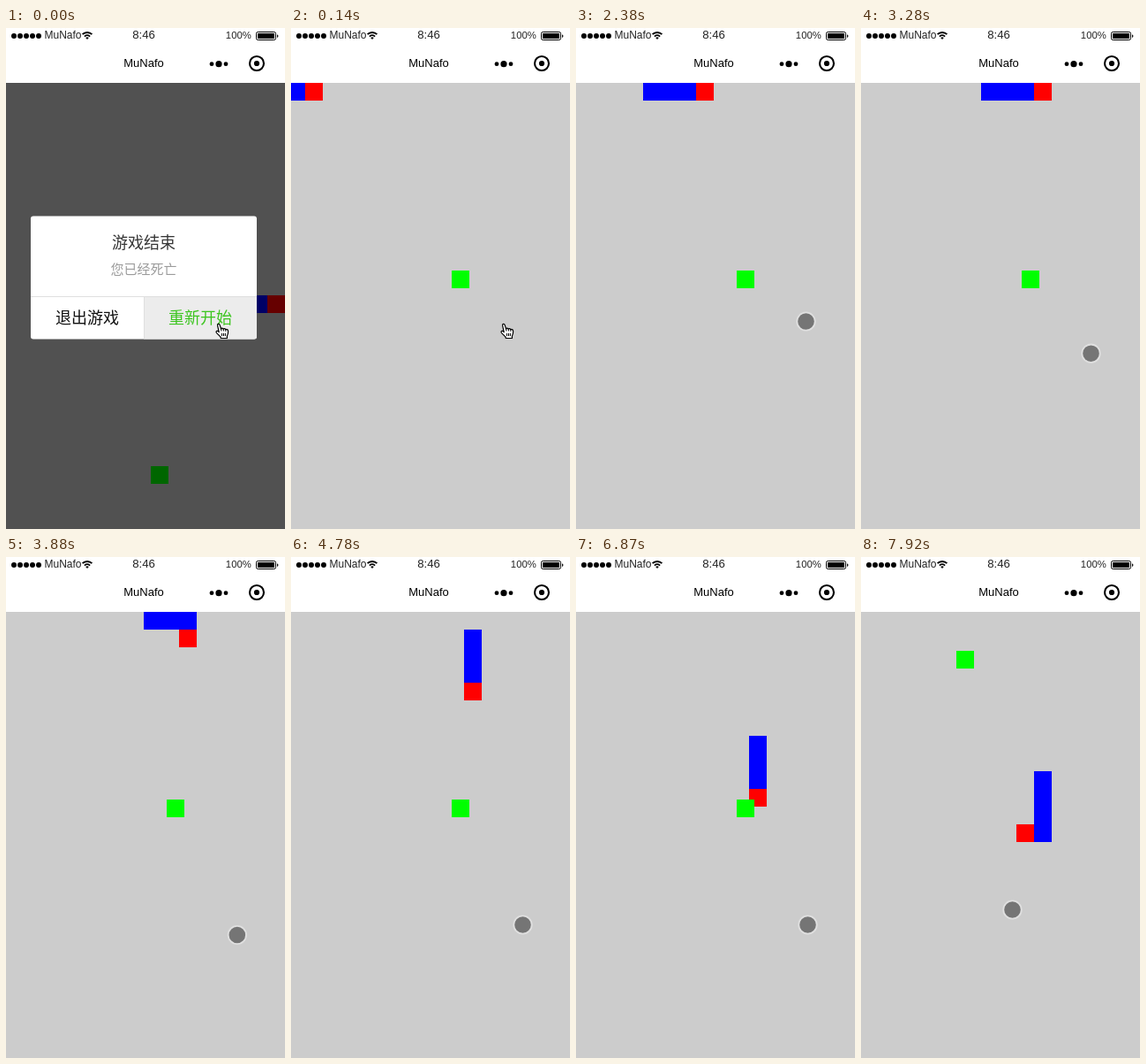
Recreate the animation shown at these times as an HTML page. Size 316 px wide and 566 px high, loop 8 s.

```html
<!DOCTYPE html>
<html lang="zh">
<head>
<meta charset="utf-8">
<title>Snake</title>
<style>
  html, body { margin: 0; width: 316px; height: 566px; overflow: hidden; background: #fff; }
  svg { display: block; }
  text { font-family: "Liberation Sans", Arial, sans-serif; text-anchor: middle; }
  .status text { fill: #222; }
  .dialog text { font-family: "Noto Sans CJK SC", "Noto Sans CJK", sans-serif; font-size: 18px; font-weight: 300; }
</style>
</head>
<body>
<svg width="316" height="566" viewBox="0 0 316 566">
  <rect y="62" width="316" height="504" fill="#ccc"/>
  <g id="snake"></g>
  <rect id="food" width="20" height="20" fill="#0f0"/>

  <g id="modal" class="dialog">
    <rect y="62" width="316" height="504" opacity=".6"/>
    <rect x="28" y="212.5" width="256" height="139" rx="3" fill="#fff"/>
    <path d="M156 303H284V348.5a3 3 0 0 1-3 3H156Z" fill="#ececec"/>
    <path d="M28 303.5H284M156.5 303V351" stroke="#dfdfdf"/>
    <text x="156" y="249.2" fill="#353535">游戏结束</text>
    <text x="156" y="278.2" fill="#9b9b9b" style="font-size:15px">您已经死亡</text>
    <text x="92" y="333.7" fill="#111">退出游戏</text>
    <text x="220" y="333.7" fill="#3cc51f">重新开始</text>
  </g>

  <rect width="316" height="62" fill="#fff"/>
  <g class="status">
    <g id="signal"></g>
    <text x="64.5" y="12.3" font-size="12">MuNafo</text>
    <path d="M86.6 7.2a7.6 7.6 0 0 1 10.8 0M88.9 9.6a4.4 4.4 0 0 1 6.2 0" fill="none" stroke="#000" stroke-width="1.9"/>
    <path d="M92 13l-1.8-2a2.6 2.6 0 0 1 3.6 0Z"/>
    <text x="156" y="12.4" font-size="13.2">8:46</text>
    <text x="263.3" y="12.3" font-size="11.3">100%</text>
    <rect x="283.5" y="4.5" width="22" height="9" rx="1.8" fill="none" stroke="#000"/>
    <rect x="285" y="6" width="19" height="6" rx=".6"/>
    <path d="M307 7.2a2 2 0 0 1 0 3.8Z"/>
  </g>
  <text x="156" y="44.3" font-size="13">MuNafo</text>
  <circle cx="233" cy="40.7" r="2.4"/>
  <circle cx="241" cy="40.7" r="3.6"/>
  <circle cx="249" cy="40.7" r="2.4"/>
  <circle cx="284" cy="40" r="8" fill="none" stroke="#000" stroke-width="2.1"/>
  <circle cx="284" cy="40" r="3.1"/>

  <g id="hand" transform="translate(236 333)" stroke="#000" stroke-width="1.2" stroke-linejoin="round">
    <path fill="#fff" d="M5.2 10.5L3.6 3.2C3.2 1.2 5.6.6 6.2 2.6L7.6 7C8 5.9 9.8 5.9 10.2 7.2C10.8 6.2 12.4 6.4 12.8 7.8C13.8 7 15.4 7.6 15.6 9.2C15.9 11.6 15.2 13.4 14.4 15V17.5H7.4L7 16C5.6 14.6 4.2 13 2.6 11.6C1.2 10.2 2.6 8.6 4.2 9.6Z"/>
    <path stroke-width="1" d="M7.6 7l.4 2.4M10.2 7.2l.3 2.2M12.8 7.8l.1 2M8.6 11.8v3.2M10.5 11.8v3.2M12.4 11.8v3.2"/>
  </g>
  <circle id="touch" r="10.2" fill="#757575" stroke="#e0e0e0" stroke-width="1.8"/>
</svg>

<script>
const LOOP = 8000, START = 140, CELL = 20;
// the screen refreshes in ticks; PRESS and EAT are counted in them
const TICK = 149.6, SLACK = 8, PRESS = 10, EAT = 47;
const $ = id => document.getElementById(id);

function add(parent, tag, attrs) {
  const el = document.createElementNS("http://www.w3.org/2000/svg", tag);
  for (const k in attrs) el.setAttribute(k, attrs[k]);
  return parent.appendChild(el);
}

function place(el, [x, y]) {
  el.setAttribute("transform", `translate(${x} ${y})`);
}

function show(el, on) {
  el.style.display = on ? "" : "none";
}

for (let i = 0; i < 5; i++) add($("signal"), "circle", { cx: 9 + 7 * i, cy: 9, r: 3 });

const cells = Array.from({ length: 5 }, (_, i) =>
  add($("snake"), "rect", { width: CELL, height: CELL, fill: i ? "#00f" : "#f00" }));

// head position after n steps: right, down, then left
function headAt(n) {
  const right = Math.min(n, 9);
  const down = Math.max(0, Math.min(n, 21) - 9);
  const left = Math.max(0, n - 21);
  return [16 + CELL * (right - left), 62 + CELL * down];
}

// finger position: swipe right, down and a little back, then left
function fingerAt(k) {
  const part = (from, to) => Math.min(1, Math.max(0, (k - from) / (to - from)));
  const right = part(11, 15), down = part(20, 23) ** 1.08, back = part(23, 26);
  const left = part(47, 49), settle = part(50, 51);
  return [
    242.5 + 18 * right + 2 * back - 95.5 * left + 4.5 * settle,
    334.5 - 3 * right + 118.5 * down - 34.5 * back - 17 * left
  ];
}

function draw(t) {
  const over = t < START;
  const k = Math.floor((t - START + SLACK) / TICK);
  const n = Math.floor(k * 0.42657 + 0.15);
  const size = k < EAT ? 4 : 5;
  cells.forEach((cell, i) => {
    place(cell, over ? [296 - CELL * i, 302] : headAt(n - i));
    show(cell, i < size);
  });
  place($("food"), over ? [164, 495] : k < EAT ? [182, 274] : [108, 106]);
  place($("touch"), fingerAt(k));
  show($("modal"), over);
  show($("hand"), k < PRESS);
  show($("touch"), k >= PRESS);
}

const begin = performance.now();
function tick() {
  draw((performance.now() - begin) % LOOP);
  requestAnimationFrame(tick);
}
tick();
</script>
</body>
</html>
```
